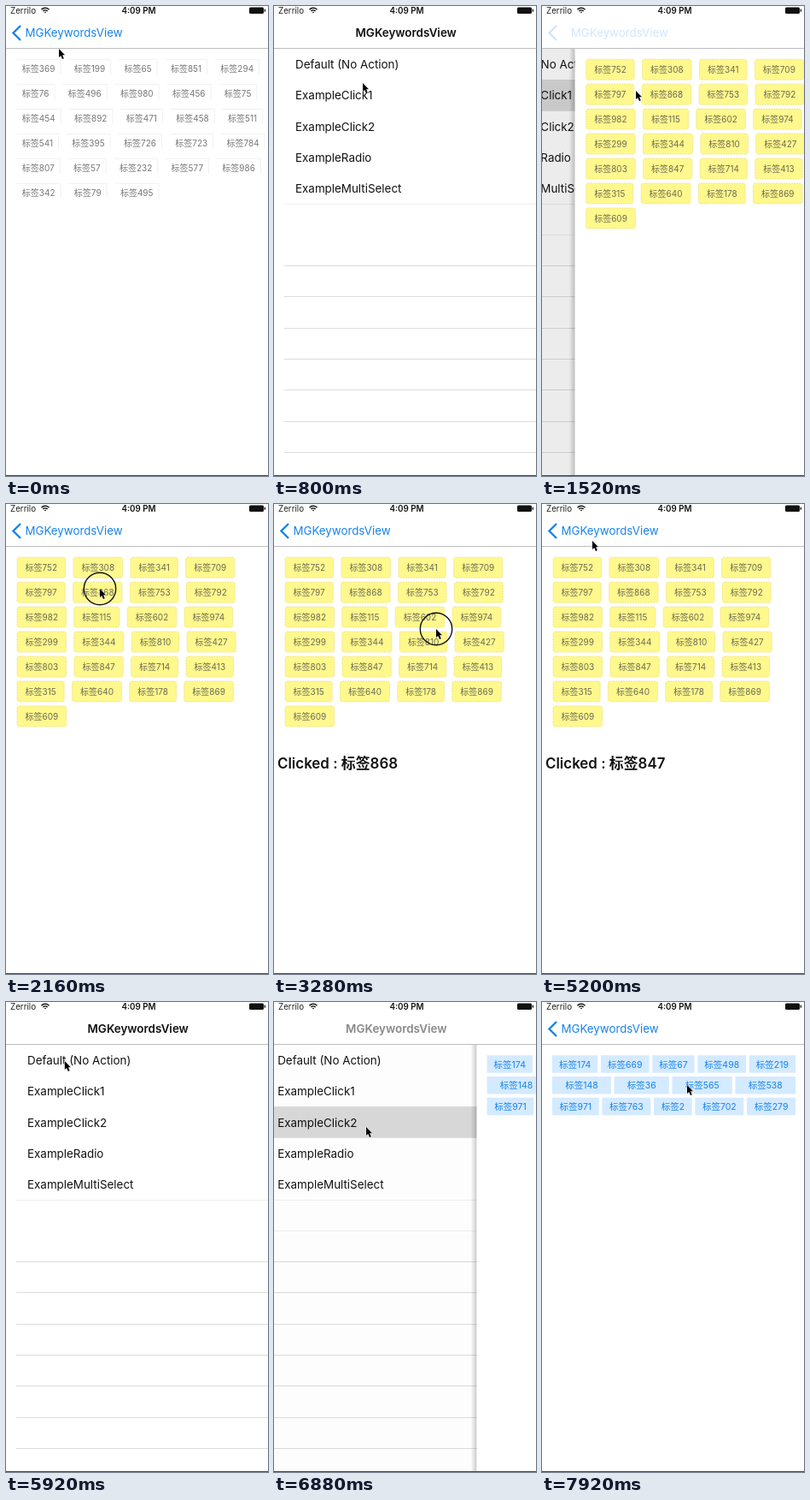
Animation of 307x549 px, one loop 8000 ms. Source, as an HTML page with a canvas:

```html
<!DOCTYPE html>
<html lang="zh">
<head>
<meta charset="utf-8">
<title>Keywords view</title>
<style>
  html, body { margin: 0; width: 100%; height: 100%; overflow: hidden; background: #fff; }
  canvas { display: block; width: 307px; height: 549px; }
</style>
</head>
<body>
<canvas id="stage"></canvas>
<script>
const W = 307, H = 549, LOOP = 8000, STEP = 80;
const NAV = 50, ROW = 36.3, BLUE = '#1783ee';
const FONT = 'Inter, "Noto Sans CJK SC", "Noto Sans CJK", sans-serif';
const canvas = document.getElementById('stage');
const ctx = canvas.getContext('2d');
const ratio = window.devicePixelRatio || 1;
canvas.width = W * ratio;
canvas.height = H * ratio;

const rows = ['Default (No Action)', 'ExampleClick1', 'ExampleClick2', 'ExampleRadio', 'ExampleMultiSelect'];

// One look per tag page; "justify" spreads each line over the given width.
const pages = [
  { tags: ['369 199 65 851 294', '76 496 980 456 75', '454 892 471 458 511',
           '541 395 726 723 784', '807 57 232 577 986', '342 79 495'],
    x: 12.3, pad: 13, gap: 9.3, height: 24, pitch: 28.9, size: 10, color: '#777' },
  { tags: ['752 308 341 709', '797 868 753 792', '982 115 602 974', '299 344 810 427',
           '803 847 714 413', '315 640 178 869', '609'],
    x: 13, pad: 19, gap: 9.3, height: 24, pitch: 28.95, size: 10, color: '#6c6a55',
    fill: '#fff88d', border: '#eee07a' },
  { tags: ['174 669 67 498 219', '148 36 565 538', '971 763 2 702 279'],
    x: 12, gap: 3.7, height: 20.5, pitch: 24.8, size: 10.5, color: BLUE,
    fill: '#d4eaff', justify: 285 }
];

const transitions = [
  { at: 240, page: 0, push: false },
  { at: 1263, page: 1, push: true },
  { at: 5440, page: 1, push: false },
  { at: 6816, page: 2, push: true }
];

const clickedTags = [[2240, '868'], [3360, '810'], [3920, '427'], [4640, '847']];
const presses = [160, 1120, 2160, 3280, 3840, 4560, 5360, 6720];

// Pointer stops: time, x, y
const pointerPath = [
  [0, 62, 50], [160, 52, 37], [320, 52, 37], [800, 104, 90], [1040, 110, 99],
  [2320, 110, 99], [3200, 190, 146], [3360, 190, 146], [3760, 232, 160], [4000, 232, 160],
  [4480, 121, 187], [4720, 121, 187], [5200, 59, 43], [5360, 52, 36], [5600, 52, 36],
  [6480, 108, 146], [7520, 108, 146], [7920, 170, 97]
];

const lastBefore = (list, test) => list.filter(test).pop();

function text(str, x, centerY, size, color, weight = 400, align = 'left') {
  ctx.font = `${weight} ${size}px ${FONT}`;
  ctx.textAlign = align;
  ctx.fillStyle = color;
  ctx.fillText(str, x, centerY + size * 0.36);
}

function rect(x, y, w, h, color) {
  ctx.fillStyle = color;
  ctx.fillRect(x, y, w, h);
}

function line(points, color, width = 1) {
  ctx.beginPath();
  points.forEach(([x, y]) => ctx.lineTo(x, y));
  ctx.strokeStyle = color;
  ctx.lineWidth = width;
  ctx.stroke();
}

function withAlpha(alpha, draw) {
  ctx.save();
  ctx.globalAlpha = Math.max(0, Math.min(1, alpha));
  draw();
  ctx.restore();
}

function shifted(dx, draw) {
  ctx.save();
  ctx.translate(dx, 0);
  draw();
  ctx.restore();
}

function drawTag(p, x, y, w, label) {
  ctx.beginPath();
  ctx.roundRect(x, y, w, p.height, p.border ? 2.5 : 0);
  if (p.fill) {
    ctx.fillStyle = p.fill;
    ctx.fill();
  } else {
    line([[x, y + 0.5], [x + w, y + 0.5], [x + w, y + 18]], '#f1f1f1');
  }
  if (p.border) {
    ctx.setLineDash([2, 1]);
    ctx.strokeStyle = p.border;
    ctx.lineWidth = 0.8;
    ctx.stroke();
    ctx.setLineDash([]);
  }
  text(label, x + w / 2, y + p.height / 2 + (p.fill ? 0.3 : -0.7), p.size, p.color, 400, 'center');
}

function drawPage(index, t) {
  const p = pages[index];
  rect(0, NAV, W, H - NAV, '#fff');
  p.tags.forEach((tagRow, r) => {
    const labels = tagRow.split(' ').map(n => '标签' + n);
    ctx.font = `400 ${p.size}px ${FONT}`;
    const widths = labels.map(s => ctx.measureText(s).width);
    const total = widths.reduce((a, b) => a + b);
    const n = labels.length;
    const pad = p.justify ? (p.justify - total - p.gap * (n - 1)) / n : p.pad;
    let x = p.x;
    labels.forEach((label, i) => {
      drawTag(p, x, 62.2 + r * p.pitch, widths[i] + pad, label);
      x += widths[i] + pad + p.gap;
    });
  });
  const clicked = index === 1 && lastBefore(clickedTags, c => c[0] <= t);
  if (clicked) text('Clicked : 标签' + clicked[1], 4, 303, 16.9, '#111', 600);
}

function drawList(selected, selectedAlpha, moving) {
  rect(0, NAV, W + 92, H - NAV, '#fff');
  for (let k = 5; k <= 13; k++) {
    if (k === 6 && !moving) continue;
    const y = Math.round(NAV + k * ROW) - 0.5;
    line([[12, y], [W, y]], k < 7 ? '#efefef' : '#dcdcdc');
  }
  withAlpha(selectedAlpha, () => rect(0, Math.floor(NAV + selected * ROW), W, ROW + 0.5, '#d9d9d9'));
  rows.forEach((label, k) => text(label, 25, NAV + (k + 0.5) * ROW, 13.4, '#111'));
}

function drawNavBar(depth, push) {
  const done = push ? depth : 1 - depth;
  const incoming = done ** 12, outgoing = (1 - done) ** 2.7;
  const x = 95.5 - 73 * depth ** 1.25;
  rect(0, 0, W, NAV, '#fff');
  withAlpha(push ? outgoing : incoming, () => text('MGKeywordsView', x, 31.5, 13.4, '#111', 600));
  withAlpha(push ? incoming : outgoing, () => {
    text('MGKeywordsView', x, 31.5, 13.3, BLUE);
    line([[17, 23], [8.5, 31.5], [17, 40]], BLUE, 2.4);
  });
  rect(0, 49, W, 1, '#bdbdbd');
}

function drawStatusBar() {
  text('Zerrilo', 5, 5.3, 9.8, '#222');
  text('4:09 PM', 155.5, 5.3, 9.8, '#111', 600, 'center');
  ctx.strokeStyle = '#111';
  ctx.lineWidth = 1.4;
  for (const r of [1, 3.6, 6.2]) {
    ctx.beginPath();
    ctx.arc(46, 8.5, r, -Math.PI * 0.76, -Math.PI * 0.24);
    ctx.stroke();
  }
  ctx.beginPath();
  ctx.roundRect(285, 1.5, 17, 7.5, 1.5);
  ctx.fillStyle = '#111';
  ctx.fill();
  rect(302.7, 3.7, 1.3, 3, '#111');
}

function drawPointer(t) {
  const i = pointerPath.findIndex(p => p[0] > t);
  const b = i < 0 ? pointerPath[pointerPath.length - 1] : pointerPath[i];
  const a = i < 0 ? b : pointerPath[i - 1];
  const u = b === a ? 0 : (t - a[0]) / (b[0] - a[0]);
  const ease = u * u * (3 - 2 * u);
  const x = a[1] + (b[1] - a[1]) * ease, y = a[2] + (b[2] - a[2]) * ease;

  if (presses.some(p => t >= p && t < p + STEP)) {
    ctx.beginPath();
    ctx.arc(x, y, 18.7, 0, 7);
    ctx.strokeStyle = '#111';
    ctx.lineWidth = 1.4;
    ctx.stroke();
  }
  ctx.beginPath();
  [[0, 0], [0, 10], [2.2, 8], [4, 12], [5.8, 11.2], [4.1, 7.3], [7, 7.2]]
    .forEach(([px, py]) => ctx.lineTo(x + px, y + py));
  ctx.closePath();
  ctx.strokeStyle = '#fff';
  ctx.lineWidth = 1;
  ctx.stroke();
  ctx.fillStyle = '#000';
  ctx.fill();
}

function drawScreen(t) {
  const current = lastBefore(transitions, n => n.at <= t) || { at: -2000, page: 0, push: true };
  const s = (t - current.at) * 0.014;
  let progress = 1 - (1 + s) * Math.exp(-s);   // critically damped spring
  if (progress > 0.985) progress = 1;
  const depth = current.push ? progress : 1 - progress;
  const upcoming = transitions.find(n => n.push && n.at > t && n.at - t < 100);
  const moving = progress < 1;

  rect(0, 0, W, H, '#fff');
  if (depth < 1) {
    shifted(-0.3 * W * depth, () => upcoming
      ? drawList(upcoming.page, 1, moving)
      : drawList(current.page, current.push ? 1 : 1 - progress, moving));
    withAlpha(0.09 * depth ** 1.6, () => rect(0, NAV, W, H, '#000'));
  }
  if (depth > 0) {
    shifted(W * (1 - depth), () => {
      const shade = ctx.createLinearGradient(-7, 0, 0, 0);
      shade.addColorStop(0, 'rgba(0,0,0,0)');
      shade.addColorStop(1, 'rgba(0,0,0,0.2)');
      if (moving) withAlpha(depth * 5, () => rect(-7, NAV, 7, H - NAV, shade));
      drawPage(current.page, t);
    });
  }
  drawNavBar(depth, current.push);
  drawStatusBar();
  rect(0, H - 1, W, 1, '#4b454a');
  drawPointer(t);
}

function frame() {
  const t = Math.floor(performance.now() % LOOP / STEP) * STEP;
  ctx.setTransform(ratio, 0, 0, ratio, 0, 0);
  drawScreen(t);
  requestAnimationFrame(frame);
}
frame();
</script>
</body>
</html>
```
